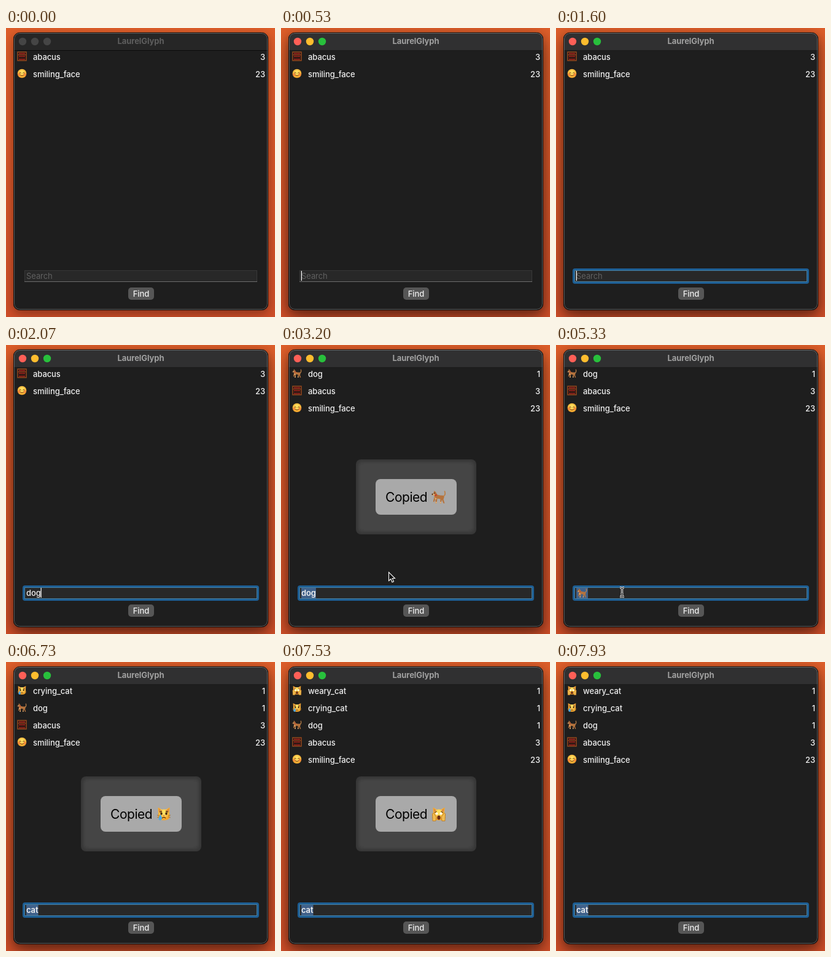
Recreate the animation shown at these times as an HTML page. Size 438x470 px, loop 8 s.

```html
<!DOCTYPE html>
<html lang="en">
<head>
<meta charset="utf-8">
<title>LaurelGlyph</title>
<style>
  html, body { margin: 0; width: 100%; height: 100%; overflow: hidden; background: #d0532a; }
  svg { display: block; }
  text { font: 500 13px Inter, Roboto, sans-serif; letter-spacing: -.08px; fill: #efefef; }
  .title { font-weight: 700; text-anchor: middle; }
  .num { text-anchor: end; }
  .hint { font-weight: 400; fill: #606060; }
  .big { font-size: 21px; font-weight: 400; letter-spacing: -.45px; fill: #000; }
</style>
</head>
<body>
<svg id="stage" width="438" height="470" viewBox="0 0 438 470">
  <defs>
    <linearGradient id="desk" x2="0" y2="1">
      <stop stop-color="#dd5e2a"/><stop offset="1" stop-color="#d04f29"/>
    </linearGradient>
    <radialGradient id="gold" cy=".4">
      <stop offset=".3" stop-color="#ffe060"/><stop offset="1" stop-color="#f3a62e"/>
    </radialGradient>
    <filter id="wide" x="-30%" y="-30%" width="160%" height="160%"><feGaussianBlur stdDeviation="15"/></filter>
    <filter id="near" x="-30%" y="-30%" width="160%" height="160%"><feGaussianBlur stdDeviation="7"/></filter>
    <filter id="soft"><feGaussianBlur stdDeviation="2.5"/></filter>
    <clipPath id="frame"><rect x="12" y="8" width="415" height="451" rx="10"/></clipPath>

    <symbol id="smile" viewBox="0 0 24 24">
      <circle cx="12" cy="12" r="11" fill="url(#gold)"/>
      <g fill="#f4763c" opacity=".75"><circle cx="5" cy="14.500" r="3"/><circle cx="19" cy="14.500" r="3"/></g>
      <path d="M5.500 11q2-3 4.500 0M14 11q2.500-3 4.500 0M8 16q4 3.500 8 0" fill="none" stroke="#7a4015" stroke-width="1.500" stroke-linecap="round"/>
    </symbol>
    <symbol id="abacus" viewBox="0 0 24 24">
      <rect x="1.500" y="1.500" width="21" height="21" fill="#2a1414" stroke="#95491d" stroke-width="2.200"/>
      <path d="M2 8.500H22" stroke="#95491d" stroke-width="1.600"/>
      <path d="M7 3V21M12 3V21M17 3V21" stroke="#6a2c18"/>
      <path d="M5 5.500H19M5 12H19M5 19.500H19" stroke="#b8281e" stroke-width="2.400" stroke-dasharray="4 1"/>
    </symbol>
    <symbol id="dog" viewBox="0 0 24 24">
      <path d="M19.500 11Q23.500 9 21.500 3" fill="none" stroke="#bd8048" stroke-width="1.800" stroke-linecap="round"/>
      <path d="M.8 7.500L3.500 5.500 4.500 2 7 4 9.500 8.500Q15 10 19 9.800L20.800 12 19.500 16 21.500 22.500H19.500L17 16.500 15.500 22.500H13.800L14.500 15.500 9.500 14.800 8.500 22.500H6.500L6.500 15.500 4 20.500 2.800 19.500 4.300 13 5 9.500 1 9.500Z" fill="#b5733d"/>
      <path d="M5 11Q6 14.500 9 14.500L6 17ZM1 7.500L5 6.500 5 9.500 1 9.500ZM6.500 20H8.800L8.500 22.500H6.500ZM13.800 20H16L15.500 22.500H13.800Z" fill="#e0b27b"/>
      <path d="M5.500 10L9 8.500" stroke="#cf3325" stroke-width="1.500"/>
      <circle cx="5" cy="6" r=".8" fill="#25120a"/><circle cx="1.500" cy="7.800" r="1" fill="#25120a"/>
    </symbol>
    <symbol id="cat" viewBox="0 0 24 24">
      <path d="M3 12L2.500 1.500 9 5Q12 4 15 5L21.500 1.500 21 12Q24 22 12 22.500 0 22 3 12Z" fill="url(#gold)"/>
      <path d="M4 4L4.500 9 8 6ZM20 4L19.500 9 16 6Z" fill="#d98042"/>
      <path d="M1 14L5 15M1 18L5 17M23 14L19 15M23 18L19 17" stroke="#a86b24" stroke-width=".8"/>
    </symbol>
    <symbol id="crying" viewBox="0 0 24 24">
      <use href="#cat"/>
      <g fill="#48270f"><ellipse cx="8" cy="11.500" rx="1.700" ry="2.200"/><ellipse cx="16" cy="11.500" rx="1.700" ry="2.200"/></g>
      <path d="M5 9L9 7.500M15 7.500L19 9M9 19q3-3 6 0" fill="none" stroke="#64360f" stroke-width="1.400"/>
      <path d="M10.500 14H13.500L12 15.800Z" fill="#d45f50"/>
      <path d="M6.500 13Q2 19 4 21.500 7.500 24 9 20 9 17 6.500 13Z" fill="#4ba8e5"/>
    </symbol>
    <symbol id="weary" viewBox="0 0 24 24">
      <use href="#cat"/>
      <path d="M5 10L8.500 8M15.500 8L19 10" stroke="#64360f" stroke-width="1.400"/>
      <g fill="#fff"><circle cx="8.500" cy="11.500" r="2"/><circle cx="15.500" cy="11.500" r="2"/></g>
      <ellipse cx="12" cy="18" rx="2.600" ry="3.600" fill="#6a2c14"/>
      <path d="M2 23.500L1.500 12Q3.500 9 5 13L8 17 7 23.500ZM22 23.500L22.500 12Q20.500 9 19 13L16 17 17 23.500Z" fill="#f0bc50" stroke="#b97420" stroke-width=".8"/>
    </symbol>
  </defs>

  <rect width="438" height="470" fill="url(#desk)"/>
  <rect id="far" x="12" y="20" width="415" height="451" rx="10" filter="url(#wide)"/>
  <rect x="12" y="12" width="415" height="451" rx="10" filter="url(#near)" opacity=".25"/>
  <g clip-path="url(#frame)">
    <rect x="12" y="8" width="415" height="451" fill="#1e1e1e"/>
    <rect x="12" y="8" width="415" height="28" fill="#262626"/>
    <rect x="12" y="36" width="415" height="1" fill="#0c0c0c"/>
    <g fill="#454545"><circle cx="27" cy="22" r="6.200"/><circle cx="47" cy="22" r="6.200"/><circle cx="67" cy="22" r="6.200"/></g>
    <g id="active">
      <rect x="12" y="8" width="415" height="28" fill="#303031"/>
      <rect x="12" y="36" width="415" height="1" fill="#1b1b1b"/>
      <circle cx="27" cy="22" r="6.200" fill="#ff5f57"/>
      <circle cx="47" cy="22" r="6.200" fill="#febc2e"/>
      <circle cx="67" cy="22" r="6.200" fill="#28c03c"/>
    </g>
  </g>
  <rect x="13.500" y="8.500" width="412" height="449" rx="9" fill="none" stroke="#fff" stroke-opacity=".28"/>
  <rect x="12.500" y="7.500" width="414" height="451" rx="10" fill="none" stroke="#0b0908" stroke-opacity=".85"/>
  <text id="name" class="title" x="219.500" y="26">LaurelGlyph</text>

  <g id="list"></g>

  <rect x="30.500" y="394.500" width="378" height="18" fill="#282828" stroke="#383838"/>
  <path d="M30 412.500H409" stroke="#6c6c6c"/>
  <g id="focus">
    <rect id="ring" fill="none" stroke="#1d5e94" stroke-width="3" rx="2.500"/>
    <rect x="30.500" y="394.500" width="378" height="18" fill="none" stroke="#4b809f"/>
  </g>
  <rect id="mark" x="33" y="395" height="17" fill="#40618a"/>
  <text id="hint" class="hint" x="33" y="408">Search</text>
  <text id="entry" x="33" y="408"></text>
  <use id="pasted" href="#dog" x="34" y="394.500" width="17" height="17"/>
  <rect id="caret" y="395" width="1.200" height="16" fill="#fff"/>

  <rect x="199" y="422" width="42" height="20" rx="5" fill="#565656"/>
  <text x="220" y="436.500" text-anchor="middle">Find</text>

  <g id="popup">
    <rect x="122" y="186" width="196" height="122" rx="8" fill="#363636"/>
    <rect x="126" y="190" width="188" height="114" rx="6" fill="#444" filter="url(#soft)"/>
    <rect x="154" y="218" width="132" height="58" rx="8" fill="#a9a9a9"/>
    <text class="big" x="170" y="255">Copied</text>
    <use id="copied" x="245" y="235" width="24" height="24"/>
  </g>

  <path id="arrow" d="M.5 .5V14.500L3.800 11.500 6 16.700 8.500 15.600 6.300 10.500H10.500Z" fill="#111" stroke="#fff" stroke-width="1.100"/>
  <g id="beam" fill="none">
    <path id="stem" d="M-3.500-7.500Q0-7.500 0-5 0-7.500 3.500-7.500M0-6V6M-3.500 7.500Q0 7.500 0 5 0 7.500 3.500 7.500M-2 3H2" stroke="#fff" stroke-width="3.200"/>
    <use href="#stem" style="display:none"/>
    <path d="M-3.500-7.500Q0-7.500 0-5 0-7.500 3.500-7.500M0-6V6M-3.500 7.500Q0 7.500 0 5 0 7.500 3.500 7.500M-2 3H2" stroke="#111" stroke-width="1.200"/>
  </g>
</svg>
<script>
const LOOP = 8000, BLINK = 530;
const $ = id => document.getElementById(id);
const set = (id, attrs) => { for (const k in attrs) $(id).setAttribute(k, attrs[k]); };
const show = (id, on) => set(id, { visibility: on ? 'visible' : 'hidden' });
const ramp = (t, a, b) => Math.min(1, Math.max(0, (t - a) / (b - a)));
const ease = p => p * p * (3 - 2 * p);
const mix = (a, b, p) => a + (b - a) * p;
const during = (t, a, b) => t >= a && t < b;

// newest first: icon, label, count, time of arrival
const items = [
  ['weary', 'weary_cat', 1, 7470],
  ['crying', 'crying_cat', 1, 6720],
  ['dog', 'dog', 1, 2400],
  ['abacus', 'abacus', 3, 0],
  ['smile', 'smiling_face', 23, 0]
];
$('list').innerHTML = items.map(([icon, label, count], i) => `<g id="row${i}">
  <use href="#${icon}" x="18" y="38" width="16" height="16"/>
  <text x="44" y="51.500">${label}</text><text class="num" x="422" y="51.500">${count}</text></g>`).join('');

// field contents: time, text, selected
const PASTE = '*';
const edits = [
  [BLINK, ''], [1800, 'd'], [1930, 'do'], [2060, 'dog'], [2400, 'dog', true],
  [4000, PASTE], [5270, PASTE, true], [5930, ''],
  [6130, 'c'], [6320, 'ca'], [6390, 'cat'], [6720, 'cat', true]
];

function drawField(t) {
  const [since, text, selected] = edits.findLast(e => t >= e[0]) || edits[0];
  const pasted = text === PASTE;
  $('entry').textContent = pasted ? '' : text;
  $('entry').style.fontWeight = selected ? 600 : 500;
  const width = pasted ? 19 : text ? $('entry').getComputedTextLength() : 0;
  show('hint', !text);
  show('pasted', pasted);
  show('mark', selected);
  set('mark', { width });
  set('caret', { x: 32.8 + width });
  show('caret', t >= since && !selected && Math.floor((t - since) / BLINK) % 2 === 0);
}

function drawPointer(t) {
  const enter = ease(ramp(t, 3060, 3190)), leave = ease(ramp(t, 3670, 3930));
  const x = mix(mix(344, 175, enter), 140, leave);
  const y = mix(mix(360, 369, enter), 402, leave);
  const inField = y > 391;
  show('arrow', during(t, 3060, 4000) && !inField);
  set('arrow', { transform: `translate(${x} ${y})` });
  show('beam', during(t, 3670, 4000) && inField || during(t, 4730, 6130));
  const bx = t < 4000 ? x : mix(140, 107.5, ease(ramp(t, 4730, 5130)));
  set('beam', { transform: `translate(${bx} 402)` });
}

function draw(t) {
  const live = ramp(t, 200, 330);
  set('active', { opacity: live });
  set('far', { opacity: mix(.12, .42, live) });
  const grey = Math.round(mix(94, 160, live));
  $('name').style.fill = `rgb(${grey},${grey},${grey})`;

  let shown = 0;
  items.forEach(([, , , from], i) => {
    show('row' + i, t >= from);
    set('row' + i, { transform: `translate(0 ${28 * shown})` });
    if (t >= from) shown++;
  });

  const focus = ease(ramp(t, 540, 840)), out = 8 * (1 - focus);
  set('focus', { opacity: focus });
  set('ring', { x: 28.5 - out, y: 392.5 - out, width: 382 + 2 * out, height: 22 + 2 * out });

  show('popup', during(t, 2400, 3400) || during(t, 6720, 7730));
  set('copied', { href: t < 6720 ? '#dog' : t < 7470 ? '#crying' : '#weary' });

  drawField(t);
  drawPointer(t);
}

function tick() {
  draw(performance.now() % LOOP);
  requestAnimationFrame(tick);
}
tick();
</script>
</body>
</html>
```
